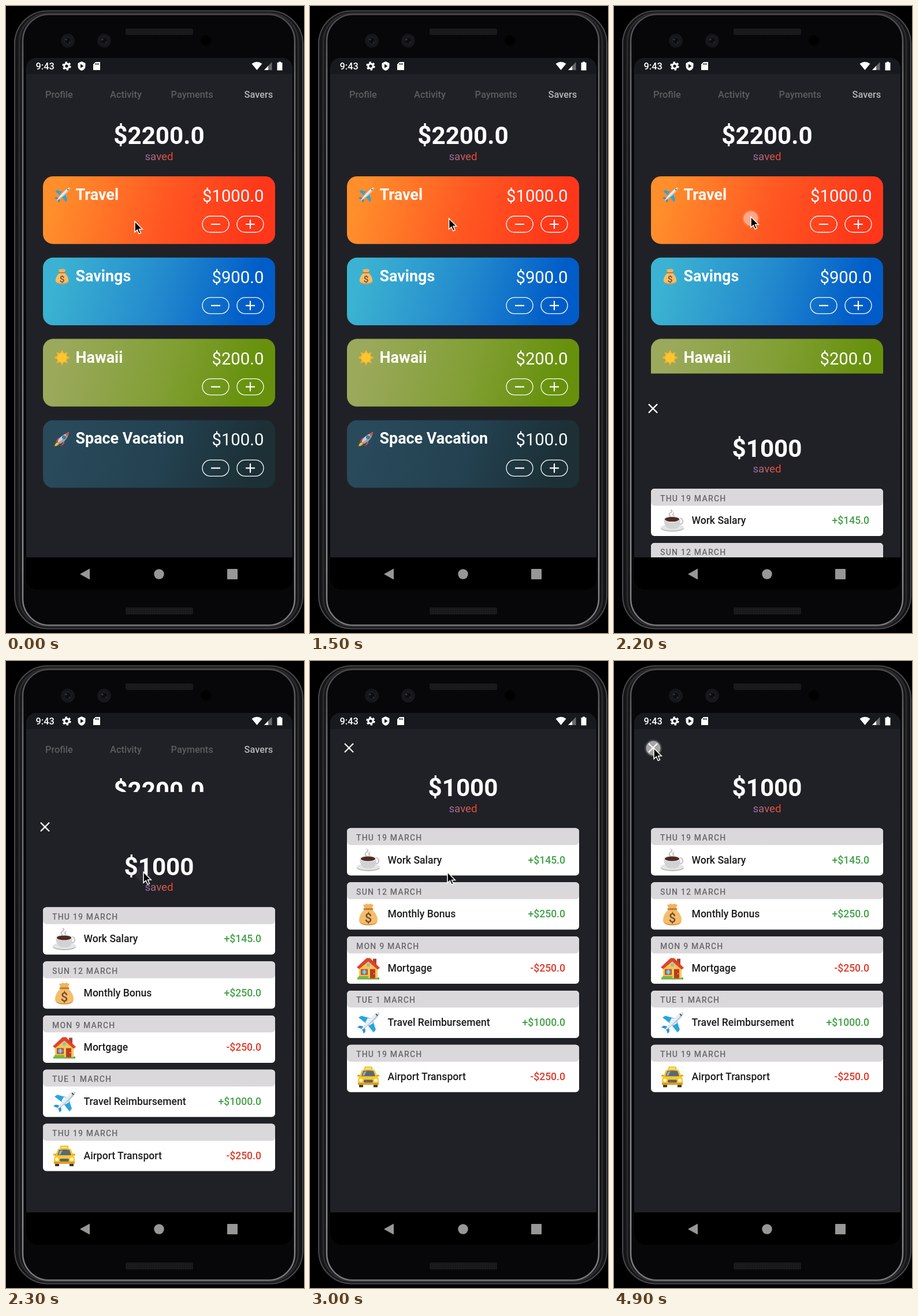
An HTML page for the animation above (5000 ms loop, 516x1086 px).

```html
<!DOCTYPE html>
<html lang="en">
<head>
<meta charset="utf-8">
<title>Savers</title>
<style>
html, body { margin: 0; width: 100%; height: 100%; overflow: hidden; background: #000; }
svg { display: block; width: 516px; height: 1086px; font-family: Roboto, sans-serif; }
.tab { font-size: 16.4px; font-weight: 500; fill: #5d5d60; }
.total { font-size: 42.2px; font-weight: 700; fill: #fff; text-anchor: middle; }
.saved { font-size: 18.74px; font-weight: 400; fill: url(#savedInk); text-anchor: middle; }
.goal { font-size: 26.9px; font-weight: 700; fill: #fff; }
.sum { font-size: 29.3px; font-weight: 400; fill: #fff; text-anchor: end; }
.date { font-size: 14.06px; font-weight: 500; fill: #69686b; letter-spacing: 1.17px; }
.item { font-size: 17.57px; font-weight: 500; fill: #1c1c1e; }
.line { fill: none; stroke: #fff; }
</style>
</head>
<body>
<svg viewBox="0 0 516 1086">
  <defs>
    <linearGradient id="savedInk" gradientUnits="userSpaceOnUse" x1="241" x2="289" y1="0" y2="0">
      <stop stop-color="#9270a8"/><stop offset=".5" stop-color="#c4605f"/><stop offset="1" stop-color="#f4402c"/>
    </linearGradient>
    <linearGradient id="rim" x1="0" x2="0" y1="0" y2="1">
      <stop stop-color="#4a4a4c"/><stop offset=".1" stop-color="#6c6c6e"/>
      <stop offset=".9" stop-color="#8c8c8f"/><stop offset="1" stop-color="#77777a"/>
    </linearGradient>
    <pattern id="mesh" width="3" height="3" patternUnits="userSpaceOnUse">
      <rect width="3" height="3" fill="#111113"/><circle cx="1.5" cy="1.5" r=".9" fill="#2c2c2e"/>
    </pattern>
    <clipPath id="screen"><rect x="35" y="90" width="461" height="921" rx="18"/></clipPath>
    <clipPath id="page"><rect x="35" y="118" width="461" height="837"/></clipPath>

    <g id="plane">
      <path d="M3 11 8 8 26 13 28 21 21 25ZM29 37 33 32 27 14 19 12 15 19Z" fill="#2ba3e2"/>
      <path d="M1 28 5 25 14 27 15 35 12 39 9 31Z" fill="#2496d6"/>
      <path d="M6 34Q15 20 30 6Q37 1 39 2Q40 5 35 11Q20 27 6 34Z" fill="#e6ecf0"/>
      <path d="M6 34Q20 25 39 2Q40 5 35 11Q20 27 6 34Z" fill="#b9c7d0"/>
      <path d="M33 5 36 8" stroke="#37474f" stroke-width="2"/>
    </g>
    <g id="bag">
      <path d="M14 11 11 3Q15 4 17 1Q20 4 24 1Q26 4 29 3L26 11Z" fill="#f2b45c"/>
      <path d="M14 11Q4 20 4 30Q4 39 20 39Q36 39 36 30Q36 20 26 11Z" fill="#f5bd69"/>
      <path d="M5 33Q9 37 20 37Q31 37 35 33Q33 39 20 39Q7 39 5 33Z" fill="#d99443"/>
      <path d="M13 11H27" stroke="#bd7b36" stroke-width="3" stroke-linecap="round"/>
      <text x="20" y="34" font-size="22" font-weight="500" text-anchor="middle" fill="#704a30">$</text>
    </g>
    <g id="sun"></g>
    <g id="rocket">
      <path d="M10 18 19 14 12 25 4 28ZM22 30 27 21 25 33 15 38Z" fill="#d9483b"/>
      <path d="M2 38Q3 29 9 28L13 32Q11 37 2 38Z" fill="#ffb52e"/>
      <path d="M9 27Q14 12 37 3Q33 25 14 32Z" fill="#c8d4dc"/>
      <path d="M14 32Q33 25 37 3Q25 19 11 29Z" fill="#93a6b2"/>
      <path d="M27 8Q32 5 37 3Q36 8 33 13Z" fill="#e0493c"/>
      <circle cx="25" cy="16" r="4" fill="#1d89c4" stroke="#526774" stroke-width="1.5"/>
    </g>
    <g id="coffee">
      <ellipse cx="20" cy="33" rx="20" ry="6" fill="#b9b9bc"/><ellipse cx="20" cy="31.5" rx="20" ry="5.5" fill="#e5e5e7"/>
      <ellipse cx="34" cy="21" rx="4" ry="5" fill="none" stroke="#c9c9cc" stroke-width="2.5"/>
      <path d="M5 17H34Q34 33 25 34H15Q6 32 5 17Z" fill="#d2d2d5"/>
      <ellipse cx="19.5" cy="17" rx="14.7" ry="5.5" fill="#eee"/><ellipse cx="19.5" cy="17.5" rx="12.5" ry="4" fill="#4e2b20"/>
      <path d="M17 13Q12 9 17 6T17 1M23 12Q19 9 23 6" fill="none" stroke="#bbb" stroke-width="1.8"/>
    </g>
    <g id="house">
      <path d="M1 36Q20 30 39 36V39H1Z" fill="#64a83b"/>
      <path d="M28 3H34V16H28Z" fill="#a84634"/>
      <path d="M4 18 19 5 36 19V37H4Z" fill="#f8c74c"/>
      <path d="M0 18 17 2H23L40 19 36 22 20 8 4 21Z" fill="#df432e"/>
      <path d="M8 22H18V30H8Z" fill="#58aee0" stroke="#c23d28" stroke-width="1.8"/><path d="M13 22V30" stroke="#fff"/>
      <path d="M23 21H32V37H23Z" fill="#b63b2b"/><circle cx="30" cy="29" r="1" fill="#ffd257"/>
      <path d="M3 33H20V38H3Z" fill="#78b843"/><circle cx="20" cy="14" r="3" fill="#7ac1e4"/>
    </g>
    <g id="taxi">
      <path d="M14 3H26L27 8H13Z" fill="#ffe060" stroke="#d79b13"/>
      <path d="M4 32H11V38H4ZM29 32H36V38H29Z" fill="#333"/>
      <path d="M9 8Q20 6 31 8L36 20Q39 23 38 34H2Q1 23 4 20Z" fill="#fbc62e"/>
      <path d="M11 10Q20 8 29 10L32 19H8Z" fill="#566a75"/><path d="M12 12 17 10 13 18H10Z" fill="#9db2bd"/>
      <path d="M1 18H6M34 18H39" stroke="#e5a91f" stroke-width="3"/>
      <rect x="12" y="25" width="16" height="5" rx="2" fill="#59646a"/>
      <circle cx="7" cy="26" r="3" fill="#fff4c8"/><circle cx="33" cy="26" r="3" fill="#fff4c8"/>
      <path d="M2 32H38" stroke="#dd951b" stroke-width="3"/>
    </g>
  </defs>

  <rect width="516" height="1086"/>
  <g fill="none">
    <rect x="15" y="8.5" width="499" height="1070" rx="57" fill="#151517" stroke="#4a4a4c" stroke-width="2"/>
    <rect x="23" y="12.5" width="483" height="1062" rx="50" stroke="#2b2b2d" stroke-width="3"/>
    <rect x="29" y="14.500" width="471" height="1058" rx="46" fill="#070709" stroke="url(#rim)" stroke-width="2.500"/>
  </g>
  <rect x="207" y="39" width="117" height="11" rx="3" fill="url(#mesh)"/>
  <rect x="207" y="1042" width="117" height="12" rx="3" fill="url(#mesh)"/>
  <g id="lenses"></g>
  <circle cx="346" cy="59.5" r="9" fill="#000"/>

  <g clip-path="url(#screen)">
    <rect x="35" y="90" width="461" height="921" fill="#202126"/>
    <g clip-path="url(#page)">
      <g id="home">
        <text class="tab" x="68" y="159">Profile</text>
        <text class="tab" x="180" y="159">Activity</text>
        <text class="tab" x="285.5" y="159">Payments</text>
        <text class="tab" x="412.5" y="159" style="fill:#b6b6b9">Savers</text>
        <text class="total" x="265" y="239">$2200.0</text>
        <text class="saved" x="265" y="267">saved</text>
      </g>
      <g id="panel">
        <rect x="35" y="90" width="461" height="866" fill="#202126"/>
        <path class="line" d="M60 143 75 158M75 143 60 158" stroke-width="2.2"/>
        <text class="total" x="265" y="234">$1000</text>
        <text class="saved" x="265" y="261.5">saved</text>
      </g>
    </g>
    <rect x="35" y="90" width="461" height="28" fill="#18191f"/>
    <g fill="#fff">
      <text x="51.5" y="110" font-size="16.4" font-weight="500">9:43</text>
      <circle class="line" cx="105" cy="104" r="4.2" stroke-width="3.2"/>
      <circle class="line" cx="105" cy="104" r="6.5" stroke-width="2.4" stroke-dasharray="3.4"/>
      <path d="M131 96 137.5 99V104Q137.5 110 131 112Q124.5 110 124.5 104V99Z"/>
      <path d="M129 100.5 134.5 104 129 107.5Z" fill="#18191f"/>
      <path d="M155 97H163V111H151V101Z"/>
      <path d="M155 99V102M157.5 99V102M160 99V102" stroke="#18191f" stroke-width="1.3"/>
      <path d="M425.5 100Q434.5 93.5 443.5 100L434.5 111Z"/>
      <path d="M447 111 460.5 97V111Z" opacity=".35"/><path d="M447 111 454 103.8V111Z"/>
      <path d="M469.5 98H472V96.5H476V98H478.5V111.5H469.5Z"/>
    </g>
    <rect x="35" y="955" width="461" height="56"/>
    <g fill="#979797">
      <path d="M128 984 145 974.5V993.5Z"/><circle cx="265" cy="984" r="8.7"/><rect x="383" y="975" width="18" height="18" rx="1"/>
    </g>
  </g>
  <g id="tap" fill="#fff"><circle r="15" opacity=".25"/><circle r="12.5"/></g>
  <path id="cursor" d="M0 0V18.5L4.3 14.7 7.2 21.5 10.4 20.2 7.5 13.6H13.3Z" stroke="#fff" stroke-width="1.5"/>
</svg>
<script>
const $ = id => document.getElementById(id);
const add = (id, markup) => $(id).insertAdjacentHTML('beforeend', markup);
const icon = (name, x, y, size) =>
  `<use href="#${name}" transform="translate(${x} ${y}) scale(${size / 40})"/>`;

let rays = '';
for (let a = 0; a < 360; a += 45) rays += `<path d="M20 0 24 9H16Z" transform="rotate(${a} 20 20)"/>`;
add('sun', `<g fill="#fbb52d">${rays}</g><circle cx="20" cy="20" r="12" fill="#ffc52f"/>`);

for (const x of [107, 170]) add('lenses', `<g transform="translate(${x} 60)">
  <circle r="12" fill="#15171a"/><circle r="6" fill="#0b0d10" stroke="#23262a"/>
  <circle cx="-3" cy="-2" r="1.5" fill="#39414a"/><circle cx="3" cy="3" r="1.2" fill="#30363d"/></g>`);

const goals = [
  ['Travel', '$1000.0', 'plane', '#ff8e2b', '#ff5722', '#ff371a'],
  ['Savings', '$900.0', 'bag', '#3bb2d1', '#2288cd', '#005cc8'],
  ['Hawaii', '$200.0', 'sun', '#9ba95c', '#829f35', '#67910c'],
  ['Space Vacation', '$100.0', 'rocket', '#294a5b', '#234150', '#1c3036']
];
// The gradient runs from the card's top left corner to its bottom right.
goals.forEach(([name, sum, pic, from, mid, to], i) => add('home', `
  <linearGradient id="card${i}" gradientUnits="userSpaceOnUse" x1="64" y1="295" x2="466" y2="412">
    <stop offset=".08" stop-color="${from}"/><stop offset=".52" stop-color="${mid}"/><stop offset=".88" stop-color="${to}"/>
  </linearGradient>
  <g transform="translate(0 ${i * 140.8})">
    <rect x="64" y="295" width="402" height="117.2" rx="17.5" fill="url(#card${i})"/>
    ${icon(pic, 83, 313.5, 28)}
    <text class="goal" x="120.5" y="336">${name}</text>
    <text class="sum" x="446.5" y="339">${sum}</text>
    <g class="line" stroke-width="1.3">
      <rect x="340" y="364" width="46" height="28" rx="14"/><rect x="400" y="364" width="46" height="28" rx="14"/>
      <path d="M355 378H371M415 378H431M423 370V386" stroke-width="2.2"/>
    </g>
  </g>`));

const entries = [
  ['THU 19 MARCH', 'Work Salary', '+$145.0', 'coffee'],
  ['SUN 12 MARCH', 'Monthly Bonus', '+$250.0', 'bag'],
  ['MON 9 MARCH', 'Mortgage', '-$250.0', 'house'],
  ['TUE 1 MARCH', 'Travel Reimbursement', '+$1000.0', 'plane'],
  ['THU 19 MARCH', 'Airport Transport', '-$250.0', 'taxi']
];
entries.forEach(([date, name, sum, pic], i) => add('panel', `
  <g transform="translate(0 ${i * 93.8})">
    <rect x="64" y="289.5" width="402" height="82" rx="6" fill="#fff"/>
    <rect x="64" y="289.5" width="402" height="29.3" rx="6" fill="#dad8db"/>
    <text class="date" x="80" y="311">${date}</text>
    ${icon(pic, 81, 325, 40)}
    <text class="item" x="134.5" y="350.5">${name}</text>
    <text class="item" x="442" y="350.5" text-anchor="end" style="fill:${sum[0] === '+' ? '#43a047' : '#e03a28'}">${sum}</text>
  </g>`));

// Keys are [time, value, value...], joined by straight lines.
function track(keys, t) {
  const i = keys.findIndex(k => k[0] > t);
  if (i < 0) return keys[keys.length - 1].slice(1);
  const a = keys[i - 1], b = keys[i], p = (t - a[0]) / (b[0] - a[0]);
  return a.slice(1).map((v, j) => v + (b[j + 1] - v) * p);
}

function bezier(x1, y1, x2, y2, x) {
  const at = (a, b, u) => 3 * a * u * (1 - u) ** 2 + 3 * b * u * u * (1 - u) + u ** 3;
  let lo = 0, hi = 1;
  for (let i = 0; i < 24; i++) {
    const u = (lo + hi) / 2;
    if (at(x1, x2, u) < x) lo = u; else hi = u;
  }
  return at(y1, y2, lo);
}

const path = [[0, 223, 373], [600, 242, 371], [900, 243, 370], [1300, 243, 370], [1800, 237, 365],
  [2200, 237, 365], [2300, 238, 365.5], [3500, 238, 366], [4000, 122, 236], [4600, 69, 151], [5000, 69, 151]];
const press = [[0, 0], [1900, 0], [2100, .6], [2200, .45], [2300, .06], [2400, 0], [4700, 0], [4900, .6], [5000, .6]];

function draw(now) {
  const t = Math.floor(now % 5000 / 100) * 100; // ten pictures a second
  const [x, y] = track(path, t), [alpha] = track(press, t);
  const slide = Math.min(1, Math.max(0, (t - 2143.5) / 400));
  const drop = 865 * (1 - bezier(.35, .91, .33, .97, slide));
  $('panel').setAttribute('transform', `translate(0 ${drop.toFixed(1)})`);
  $('cursor').setAttribute('transform', `translate(${x} ${y})`);
  $('tap').setAttribute('transform', t < 3500 ? 'translate(237 368)' : 'translate(68 151)');
  $('tap').setAttribute('opacity', alpha);
}

const start = performance.now();
function loop() {
  draw(performance.now() - start);
  requestAnimationFrame(loop);
}
draw(0);
loop();
</script>
</body>
</html>
```
